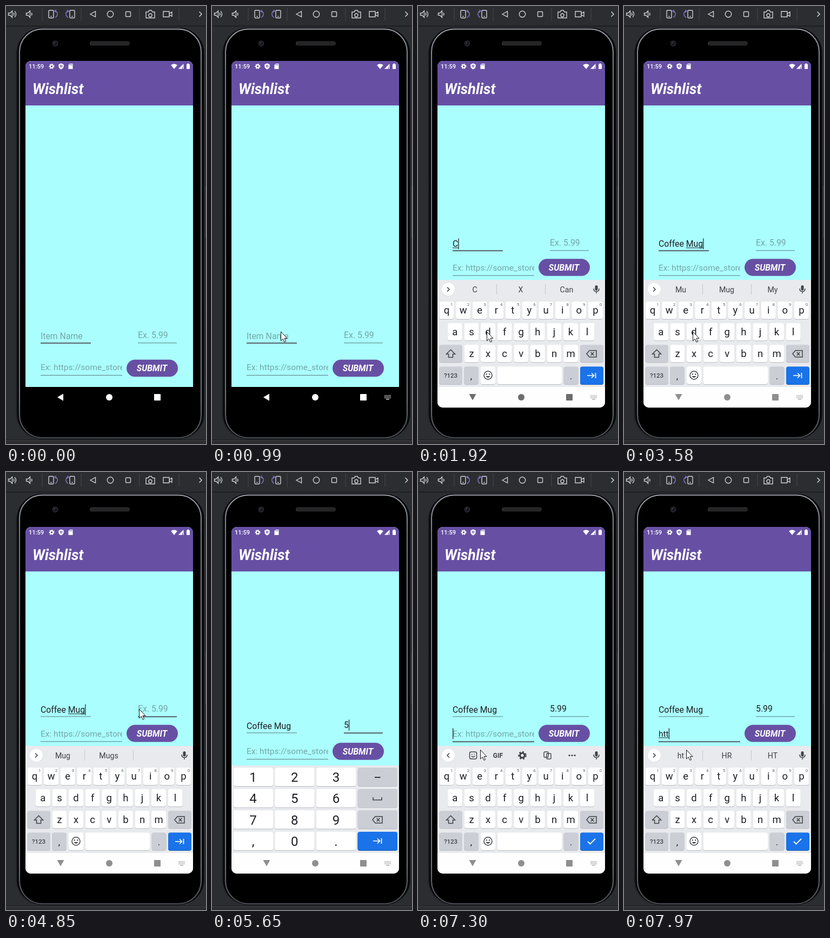
Animation, 370 px wide and 806 px high, one loop 8000 ms. Source, as an HTML page with a canvas:

```html
<!DOCTYPE html>
<html lang="en">
<head>
<meta charset="utf-8">
<title>Wishlist</title>
<style>
html, body { margin: 0; width: 100%; height: 100%; overflow: hidden; background: #2b2d30; }
canvas { display: block; width: 100vw; height: 100vh; }
</style>
</head>
<body>
<canvas id="stage" width="370" height="806"></canvas>
<script>
const ctx = document.getElementById('stage').getContext('2d');
const LOOP = 8000, STEP = 67;
const PURPLE = '#6750a4', CYAN = '#aafffe', INK = '#1d1f24', HINT = '#75a5a8';
const KB = '#e8eaed', GREY = '#cbced5', BLUE = '#1a73e8', ICON = '#3f4348';

// Timelines: [start, value]
const itemText = [[0, ''], [1730, 'C'], [2250, 'Co'], [2390, 'Cof'], [2520, 'Coff'], [2720, 'Coffe'],
  [2990, 'Coffee'], [3260, 'Coffee '], [3450, 'Coffee M'], [3515, 'Coffee Mu'], [3580, 'Coffee Mug']];
const priceText = [[0, ''], [5650, '5'], [5710, '5.'], [6040, '5.9'], [6110, '5.99']];
const linkText = [[0, ''], [7770, 'h'], [7910, 'ht'], [7970, 'htt']];
const hintWords = [[0, ''], [1790, 'C|X|Can'], [2250, 'Co|Come|Could'], [2390, 'Cof|Of|Coffee'],
  [2590, 'Coff|Off|Coffee'], [2790, 'Coffe|Coffee|Coffees'], [3120, 'Coffee|Coffees|Coffees'],
  [3260, 'shop|and|is'], [3450, 'M|My|Me'], [3515, 'Mu|My|Mug'], [3580, 'Mu|Mug|My'],
  [3790, 'Mug|Mugs|'], [4910, ''], [7910, 'ht|HR|HT']];
const focusAt = [[0, 'item'], [4780, 'price'], [7240, 'link']];
const caretAt = [[0, ''], [250, 'item'], [750, ''], [1330, 'item'], [4910, 'price'], [5380, ''],
  [5650, 'price'], [6580, ''], [7240, 'link']];
const layoutAt = [
  [0, { item: 620, link: 679.5, button: 666.5 }],
  [1058, { item: 450, link: 496, button: 481 }],
  [4910, { item: 480, link: 528.5, button: 514 }],
  [7240, { item: 450, link: 496, button: 481 }]
];
// Pointer moves: start, move length, end, from x y, to x y
const moves = [
  [190, 600, 3980, 252, 702, 127, 599],
  [4120, 560, 4980, 136, 588, 246, 436],
  [6770, 430, LOOP, 201, 471, 115, 511]
];

const at = (list, t) => list.reduce((v, [start, value]) => t >= start ? value : v, list[0][1]);
const clamp = v => Math.max(0, Math.min(1, v));
const easeOut = v => 1 - (1 - v) ** 3;
const mix = (a, b, k) => a + (b - a) * k;

function rect(x, y, w, h, color) {
  ctx.fillStyle = color;
  ctx.fillRect(x, y, w, h);
}
function box(x, y, w, h, r, color) {
  ctx.beginPath();
  ctx.roundRect(x, y, w, h, r);
  ctx.fillStyle = color;
  ctx.fill();
}
function frame(x, y, w, h, r, color, width = 1) {
  ctx.beginPath();
  ctx.roundRect(x, y, w, h, r);
  ctx.strokeStyle = color;
  ctx.lineWidth = width;
  ctx.stroke();
}
function disc(x, y, r, color) {
  ctx.beginPath();
  ctx.arc(x, y, r, 0, 7);
  ctx.fillStyle = color;
  ctx.fill();
}
function ring(x, y, r, color, width = 1.4) {
  ctx.beginPath();
  ctx.arc(x, y, r, 0, 7);
  ctx.strokeStyle = color;
  ctx.lineWidth = width;
  ctx.stroke();
}
function shape(d, x, y, fill, line, width = 1.4) {
  const path = new Path2D(d);
  ctx.save();
  ctx.translate(x, y);
  if (fill) { ctx.fillStyle = fill; ctx.fill(path); }
  if (line) {
    ctx.strokeStyle = line;
    ctx.lineWidth = width;
    ctx.stroke(path);
  }
  ctx.restore();
}
function text(s, x, y, size, color, align = 'left', style = '400') {
  ctx.font = `${style} ${size}px Roboto, Arial, sans-serif`;
  ctx.textAlign = align;
  ctx.fillStyle = color;
  ctx.fillText(s, x, y);
}
function gear(x, y, r, color) {
  ctx.setLineDash([r * 0.36, r * 0.425]);
  ring(x, y, r * 0.85, color, r * 0.4);
  ctx.setLineDash([]);
  ring(x, y, r * 0.57, color, r * 0.42);
}
function keyboardIcon(x, y, color) {
  for (let row = 0; row < 3; row++)
    for (let i = 0; i < 6; i++) rect(x - 6 + i * 2.1, y - 4 + row * 2.3, 1.3, 1.3, color);
  rect(x - 3, y + 3, 6, 1.3, color);
}

function toolbar() {
  const c = '#ced0d6', violet = '#7d73c4';
  rect(0, 0, 370, 806, '#2b2d30');
  rect(0, 36, 370, 2, '#1e1f22');
  for (const x of [67, 139, 247, 320]) rect(x - 0.5, 3, 1, 24, '#46484d');
  const speaker = 'M-7.500-2h3l4-4v12l-4-4h-3z';
  shape(speaker, 12, 15, null, c);
  shape('M2-2.500q2 2.500 0 5M4-5.500q5 5.500 0 11', 12, 15, null, c);
  shape(speaker, 45, 15, null, c);
  shape('M2-2.500q2 2.500 0 5', 45, 15, null, c);
  for (const side of [-1, 1]) {
    ctx.save();
    ctx.translate(103 + side * 16, 15);
    ctx.scale(-side, 1);
    frame(-8, -7, 9, 14, 1.5, c, 1.4);
    rect(-5, 3.5, 3, 1.2, c);
    shape('M3-6q6 1 5 7q-1 4-4 5M6-8l-3 2l3 3', 0, 0, null, violet, 1.5);
    ctx.restore();
  }
  shape('M-5 0L4.500-5v10z', 161, 15, null, c);
  ring(193, 15, 5.7, c);
  frame(221.5, 10.5, 9, 9, 1, c, 1.4);
  shape('M-8-4h4l2-3h4l2 3h4v11h-16z', 267, 15, null, c);
  ring(267, 17, 3, c);
  shape('M-8-5h11v10h-11zM3-1l5-3v8l-5-3', 299, 15, null, c);
  shape('M-2.500-4.500l4.500 4.500l-4.500 4.500', 360, 15, null, c, 1.5);
}

function phone() {
  rect(0, 798, 370, 1, '#1c1c1e');
  rect(0, 799, 370, 1.5, '#403c3c');
  box(365, 330, 4, 97, 2, '#15161a');
  frame(365.500, 330.500, 3.500, 96, 2, '#505259');
  box(18, 39, 350, 759, 48, '#0b0c0e');
  frame(19, 39.500, 348.500, 757.500, 47, '#35373d', 1.2);
  const metal = ctx.createLinearGradient(0, 40, 0, 797);
  metal.addColorStop(0, '#9a9ca5');
  metal.addColorStop(0.1, '#777981');
  metal.addColorStop(0.9, '#71737a');
  metal.addColorStop(1, '#4a4c52');
  frame(25, 42.500, 336, 752, 42, metal, 2);
  box(26.500, 44, 333, 749, 40, '#000');
  disc(91, 69, 5.500, '#25262b');
  disc(91, 69, 3, '#101116');
  disc(90, 68, 1.2, '#45485a');
  box(155, 65, 74, 7.500, 3.500, '#303032');
  for (let i = 0; i < 24; i++)
    for (let j = 0; j < 2; j++) rect(157 + i * 3 + j * 1.5, 66.500 + j * 2.700, 1.5, 1.7, '#0d0d0e');
}

function header() {
  rect(36, 101, 310, 600, CYAN);
  rect(36, 101, 310, 82, PURPLE);
  text('11:59', 42, 115, 11.1, '#fff', 'left', '500');
  gear(84.500, 111, 4.800, '#fff');
  shape('M0-5.500l4.700 2v3.300q0 4-4.700 5.900q-4.700-1.900-4.700-5.900v-3.300z', 102, 111, '#fff');
  disc(102, 110.500, 2.3, PURPLE);
  disc(102, 110.500, 1.1, '#fff');
  shape('M-1.500-5h5.500v10h-8v-7.500z', 119.500, 111, '#fff');
  for (let i = 0; i < 3; i++) rect(117.500 + i * 1.9, 107, 1, 2, PURPLE);
  shape('M-5.800-2.300q5.800-4.600 11.600 0l-5.800 7.300z', 311, 111, '#fff');
  shape('M4.500-4.800v9.600h-9.600z', 324, 111, '#fff');
  rect(326, 112, 1, 4, PURPLE);
  box(334, 107, 6, 9, 1, '#fff');
  rect(335.500, 105.800, 3, 1.5, '#fff');
  text('Wishlist', 49, 162, 27, '#fff', 'left', 'italic 700');
}

function field(value, hint, x, w, line, gap, focused, caret, composing, size = 15.8) {
  const base = line - gap;
  ctx.save();
  ctx.beginPath();
  ctx.rect(x - 1, line - 30, w + 1, 29);
  ctx.clip();
  text(value || hint, x, base, size, value ? INK : HINT);
  const end = x + (value ? ctx.measureText(value).width : 0);
  if (composing) {
    const from = x + ctx.measureText(value.slice(0, value.lastIndexOf(' ') + 1)).width;
    rect(from, base + 2, end - from, 1, INK);
  }
  if (caret) rect(end, base - 15, 1.4, 20, '#33363c');
  ctx.restore();
  rect(x, line - 0.5, w, focused ? 1.7 : 1, focused ? '#49454f' : '#5d7a80');
}

function form(t) {
  const lay = at(layoutAt, t), focus = at(focusAt, t), caret = at(caretAt, t);
  const item = at(itemText, t), link = at(linkText, t);
  const composing = t < 4910 && item !== '' && !item.endsWith(' ');
  field(item, 'Item Name', 64, 93, lay.item, 7.500, focus === 'item', caret === 'item', composing);
  field(at(priceText, t), 'Ex. 5.99', 244, 72, lay.item, 9.300, focus === 'price', caret === 'price', false);
  field(link, 'Ex: https://some_store.com', 64, 151, lay.link, 9.500, focus === 'link', caret === 'link', link !== '', 15.5);
  box(223, lay.button - 15.700, 95, 31.500, 15.7, PURPLE);
  text('SUBMIT', 270, lay.button + 5.700, 15.8, '#fff', 'center', 'italic 700');
}

function key(x, y, w, h, color = '#fff') {
  box(x, y + 1, w, h, 4, color === BLUE ? '#1558b0' : '#b9bcc2');
  box(x, y, w, h, 4, color);
}
function backspace(x, y) {
  shape('M-9 0l5-6h13v12h-13zM-1.500-3l6 6m0-6l-6 6', x, y, null, ICON, 1.5);
}
function tabArrow(x, y) {
  shape('M-8 0h12M0-4.500l4.500 4.500l-4.500 4.500M7.500-5v10', x, y, null, '#fff', 1.7);
}

function strip(words) {
  disc(56, 522, 12.2, '#d3d6da');
  disc(56, 521.500, 12, '#fff');
  shape(words ? 'M-2-4l4 4l-4 4' : 'M2-4l-4 4l4 4', 56, 521.500, null, ICON, 1.6);
  box(327.500, 514, 5, 9.500, 2.5, ICON);
  shape('M-5-1q0 5.500 5 5.500t5-5.500M0 4.500v3.500', 330, 521, null, ICON, 1.5);
  if (words) {
    rect(145, 512, 1, 19, '#c3c6cb');
    rect(235, 512, 1, 19, '#c3c6cb');
    words.split('|').forEach((w, i) => text(w, 105 + i * 85, 527, 14.2, ICON, 'center'));
    return;
  }
  frame(95.500, 515, 13, 13, 3, ICON, 1.5);
  shape('M-3 1q3 4 6 0M-3-2h1.500M1.500-2h1.500', 102, 521.500, null, ICON, 1.4);
  text('GIF', 148, 526, 12, ICON, 'center', '700');
  gear(193, 521.500, 7.500, ICON);
  frame(233, 515, 8, 10, 1.5, ICON, 1.4);
  frame(238, 518, 8, 10, 1.5, ICON, 1.4);
  for (let i = -1; i < 2; i++) disc(285 + i * 5, 521.500, 1.6, ICON);
}

function letters(t) {
  rect(36, 504, 310, 240, KB);
  strip(at(hintWords, t));
  const rows = [['qwertyuiop', 53, 544, 566], ['asdfghjkl', 68.300, 583.500, 606], ['zxcvbnm', 99, 623.500, 645.500]];
  rows.forEach(([chars, x0, y, base], r) => [...chars].forEach((c, i) => {
    const x = x0 + i * 30.600;
    key(x - 13.500, y, 27, 32);
    text(c, x, base, 18.5, INK, 'center');
    if (!r) text((i + 1) % 10, x + 9.500, 552, 8, '#5f6368', 'center');
  }));
  key(39.500, 623.500, 42.500, 32, GREY);
  shape('M0-7.500l8 8h-4v6h-8v-6h-4z', 60.500, 640, null, ICON, 1.5);
  key(300, 623.500, 43, 32, GREY);
  backspace(321, 640);
  key(39.500, 663.500, 42.500, 32.5, GREY);
  text('?123', 60.500, 684, 11.500, ICON, 'center', '500');
  key(85, 663.500, 27, 32.5, GREY);
  text(',', 98.500, 687, 17, INK, 'center');
  key(116, 663.500, 27, 32.5);
  ring(129.500, 679.500, 7.500, ICON, 1.5);
  disc(126.800, 677.500, 1.2, ICON);
  disc(132.200, 677.500, 1.2, ICON);
  shape('M-4 1.500q4 6 8 0z', 129.500, 679.500, ICON);
  key(146.500, 663.500, 119.500, 32.5);
  key(269.500, 663.500, 27, 32.5, GREY);
  text('.', 283, 687, 17, INK, 'center');
  key(300, 663.500, 43, 32.5, BLUE);
  if (t < 7240) tabArrow(321, 680);
  else shape('M-7 0l4.500 4.500l9.500-9.500', 321, 680, null, '#fff', 1.8);
}

function numbers() {
  rect(36, 540, 310, 204, KB);
  ['123', '456', '789', ',0.'].forEach((chars, r) => {
    const y = 544 + r * 39.300;
    [...chars].forEach((c, i) => {
      key(39.500 + i * 76.700, y, 73.500, 34);
      text(c, 76 + i * 76.700, y + 26, 24, INK, 'center');
    });
    key(269.500, y, 73.500, 34, r === 3 ? BLUE : GREY);
  });
  rect(301, 561, 10.500, 1.7, INK);
  shape('M-8-2v5h16v-5', 306, 600.500, null, ICON, 1.6);
  backspace(306, 640);
  tabArrow(306, 679);
}

function navBar(t) {
  const open = t >= 1058;
  const g = Math.round(mix(84, 143, clamp((t - 1330) / 1460)));
  const c = open ? `rgb(${g},${g},${g})` : '#fff';
  rect(36, 701, 310, 38, open ? '#fefefe' : '#000');
  shape(open ? 'M-6.500-6h13l-6.500 11.500z' : 'M-6 0l11-6.500v13z', 101, 720, c);
  disc(191, 720, 6, c);
  box(274, 714, 12, 12, 1, c);
  if (t >= 990) keyboardIcon(325, 720, open ? '#a2a2a2' : '#e8e8e8');
}

function pointer(t) {
  for (const [start, len, end, x0, y0, x1, y1] of moves) {
    if (t < start || t >= end) continue;
    const k = clamp(Math.floor((t - start) / STEP) * STEP / (len - STEP));
    const e = k * (2 - k);
    shape('M.5.500v16.500l3.800-3.500l2.700 6l2.600-1.200l-2.600-5.800h5z', mix(x0, x1, e), mix(y0, y1, e), '#fff', '#111', 1);
  }
}

function draw(t) {
  toolbar();
  phone();
  ctx.save();
  ctx.beginPath();
  ctx.roundRect(36, 101, 310, 638, 10);
  ctx.clip();
  header();
  form(t);
  if (t >= 4910 && t < 7240) numbers();
  else if (t >= 1058) {
    const snap = Math.floor((t - 1058) / 68) + 1;
    ctx.save();
    ctx.translate(0, 235 * (1 - easeOut(clamp(snap / 5))));
    letters(t);
    ctx.restore();
  }
  navBar(t);
  ctx.restore();
  pointer(t);
}

const began = performance.now();
function tick() {
  draw((performance.now() - began) % LOOP);
  requestAnimationFrame(tick);
}
tick();
</script>
</body>
</html>
```
